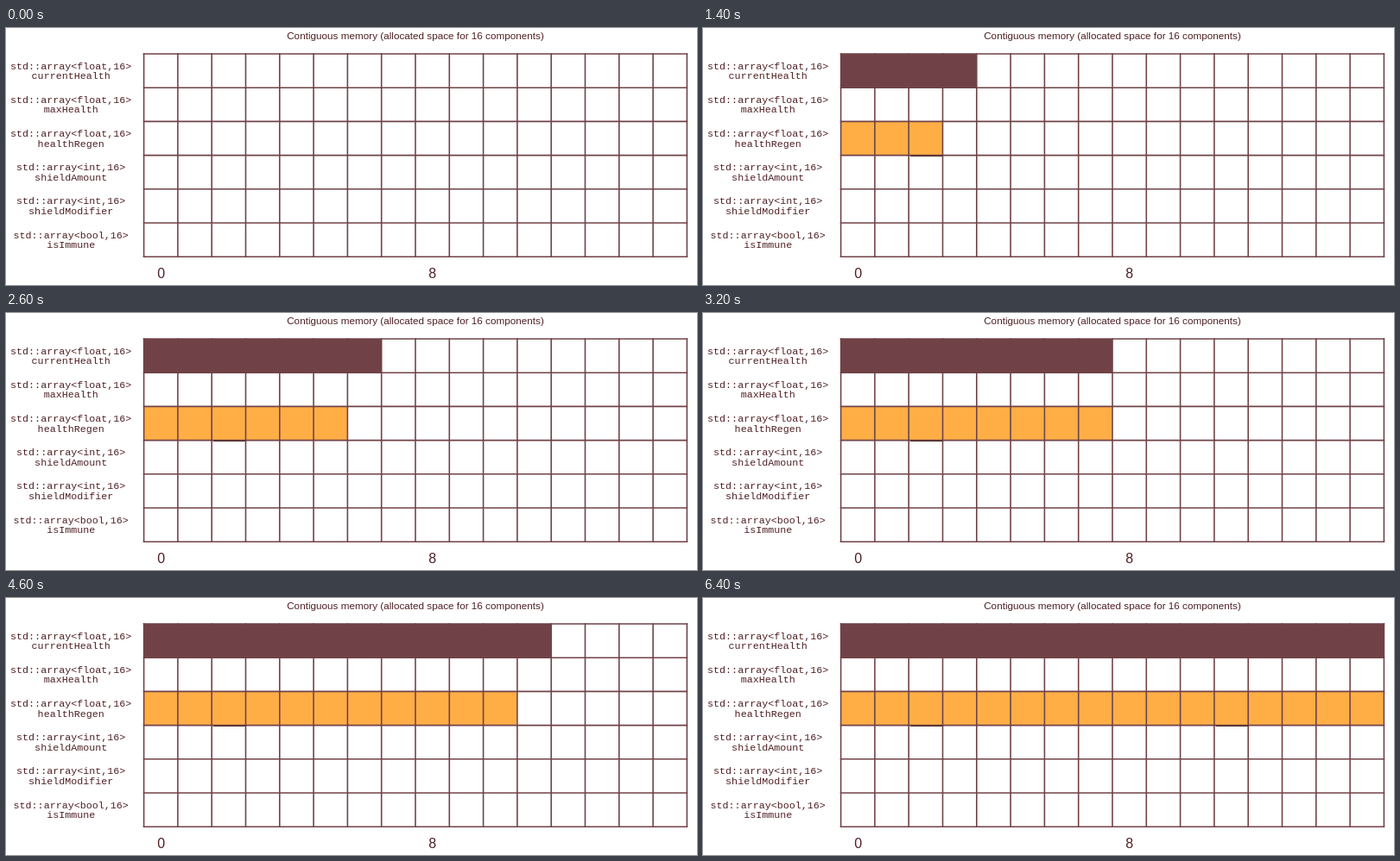
Animation of 800x298 px, one loop 6.6 s. Source, as an HTML page with a canvas:

```html
<!DOCTYPE html>
<html lang="en">
<head>
<meta charset="utf-8">
<title>Contiguous memory</title>
<style>
html, body { margin: 0; width: 100%; height: 100%; overflow: hidden; background: #fff; }
canvas { display: block; }
</style>
</head>
<body>
<canvas id="stage" width="800" height="298"></canvas>
<script>
const ctx = document.getElementById('stage').getContext('2d');
const STEP = 200, STEPS = 33;
const LEFT = 159.6, TOP = 30, CELL_W = 39.3, CELL_H = 39.2, COLS = 16;
const MAROON = '#704247', ORANGE = '#ffae46', INK = '#4f2023', SHADE = '#452a20';
const SANS = '"Liberation Sans", Arial, sans-serif';
const MONO = '"Liberation Mono", "Courier New", monospace';
const ROWS = [
  ['float', 'currentHealth'],
  ['float', 'maxHealth'],
  ['float', 'healthRegen'],
  ['int', 'shieldAmount'],
  ['int', 'shieldModifier'],
  ['bool', 'isImmune']
];
const SHADED_COLS = [2, 11];

const colX = c => LEFT + c * CELL_W;
const rowY = r => TOP + r * CELL_H;

function text(str, x, y, size, family) {
  ctx.font = `${size}px ${family}`;
  ctx.fillText(str, x, y);
}

function line(x1, y1, x2, y2) {
  ctx.beginPath();
  ctx.moveTo(x1, y1);
  ctx.lineTo(x2, y2);
  ctx.stroke();
}

function fillCells(row, count, color) {
  ctx.fillStyle = color;
  ctx.fillRect(LEFT, rowY(row), count * CELL_W, CELL_H);
}

function drawLabels() {
  ctx.fillStyle = INK;
  ctx.textAlign = 'center';
  text('Contiguous memory (allocated space for 16 components)', 474, 12.8, 11.73, SANS);
  ROWS.forEach(([type, name], r) => {
    text(`std::array<${type},16>`, 75.2, rowY(r) + 17.6, 11.7, MONO);
    text(name, 75.2, rowY(r) + 29.2, 11.7, MONO);
  });
  text('0', 179.8, 290, 16, SANS);
  text('8', 493.8, 290, 16, SANS);
}

function drawGrid() {
  ctx.strokeStyle = MAROON;
  ctx.lineWidth = 1.6;
  ctx.lineCap = 'square';
  for (let c = 0; c <= COLS; c++) line(colX(c), TOP, colX(c), rowY(ROWS.length));
  for (let r = 0; r <= ROWS.length; r++) line(LEFT, rowY(r), colX(COLS), rowY(r));
}

function draw(step) {
  const health = Math.ceil(step / 2), regen = Math.floor(step / 2);
  ctx.fillStyle = '#fff';
  ctx.fillRect(0, 0, 800, 298);
  drawLabels();
  fillCells(0, health, MAROON);
  fillCells(2, regen, ORANGE);
  drawGrid();
  ctx.fillStyle = SHADE;
  for (const c of SHADED_COLS) {
    if (regen > c) ctx.fillRect(colX(c) + 2, 148, CELL_W - 2, 1);
  }
}

function tick(now) {
  draw(Math.floor(now / STEP) % STEPS);
  requestAnimationFrame(tick);
}

draw(0);
requestAnimationFrame(tick);
</script>
</body>
</html>
```
